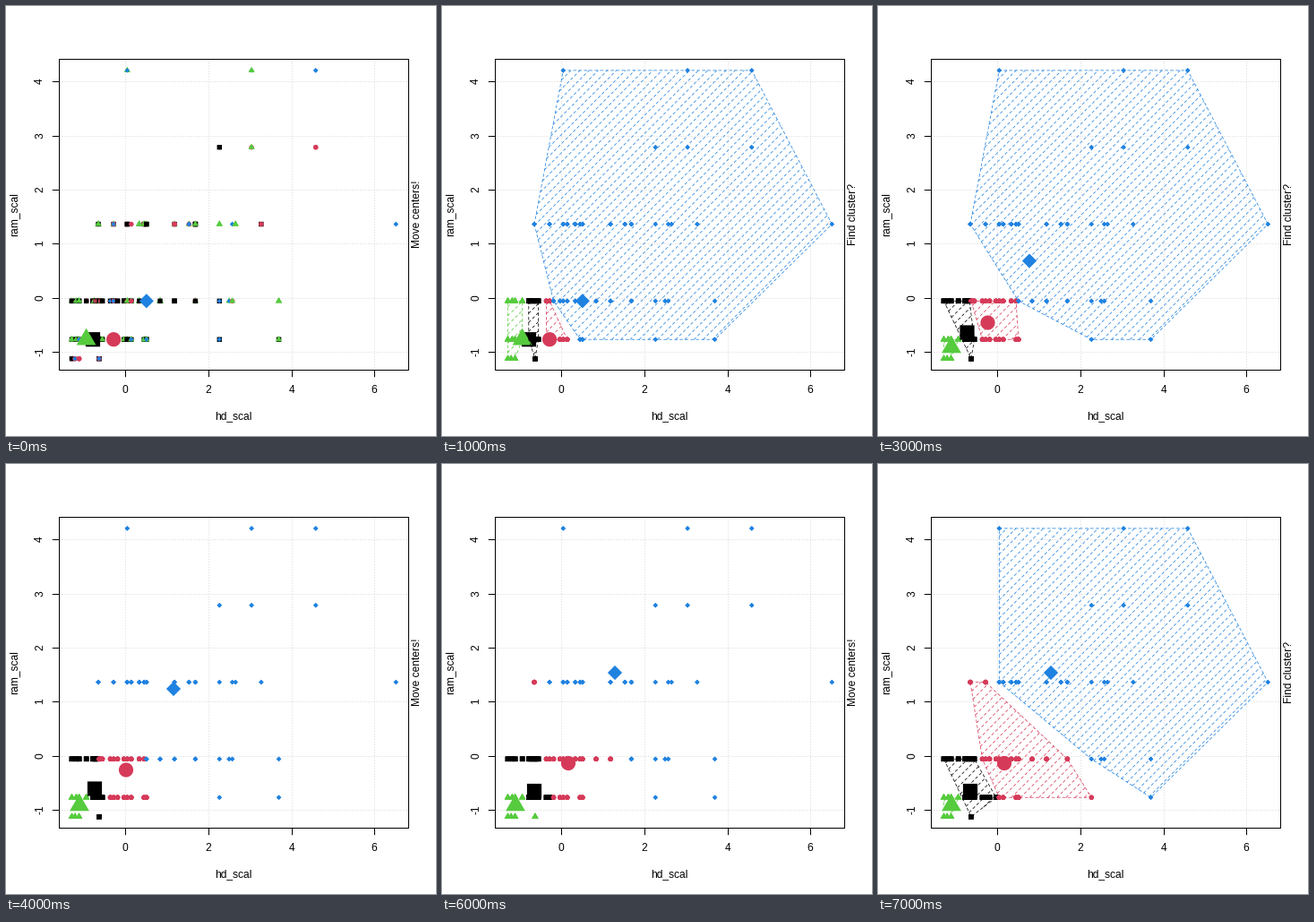
Write a matplotlib script that moves like this. It is 480 px wide and 480 px high and loops after 8 s.

```python
import numpy as np
import matplotlib.pyplot as plt
from matplotlib.animation import FuncAnimation
from matplotlib.collections import LineCollection, PolyCollection

plt.rcParams["font.family"] = "Liberation Sans"
SIZE = 480
COLORS = ["#000000", "#D63A59", "#56CB3E", "#1F82E0"]

# Plot box, and the pixel position and length of the scaled axes
LEFT, RIGHT, TOP, BOTTOM = 59.5, 449.5, 59.5, 406.5
MID_X, MID_Y = (LEFT + RIGHT) / 2, (TOP + BOTTOM) / 2
X0, Y0 = 133.8, 326.3
XU, YU = 46.3, 60.4
HATCH = 7.2 * np.sqrt(2)

# Common disk sizes, combined for each memory size
TINY = [80, 107, 125, 170]
SMALL = [*range(210, 271, 10), 320, 340, 365]
MEDIUM = [405, 425, 450]
LARGE = [530, 545]
DISKS = {
    32: [425, 1200, 1600],
    24: [1000, 1200, 1600],
    16: [245, 340, *MEDIUM[1:], 500, *LARGE, 720, 810, 850,
         1000, 1080, 1100, 1260, 2100],
    8: [*TINY, *SMALL, *MEDIUM, 500, *LARGE, 630, 720, 850,
        1000, 1060, 1080, 1370],
    4: [*TINY, *SMALL, *MEDIUM, *LARGE, 1000, 1370],
    2: [80, 100, 125, 250],
}

# Pixel centers of the black, red, green and blue group at each step
CENTERS = np.array([
    [(97, 372.2), (120.1, 372.2), (89.6, 372.2), (156.8, 329.3)],
    [(99.5, 364.5), (122.5, 353.5), (82, 381), (169, 284.5)],
    [(99, 362.5), (134, 341.5), (82, 381), (187, 251)],
    [(103, 365), (141, 334), (82, 381), (193, 233)],
])


def load_points():
    """Machines in pixels; common configurations occur several times."""
    points = []
    for ram, disks in DISKS.items():
        for disk in disks:
            x = 73.51 + (disk - 80) * 0.1791
            y = 393.69 - (ram - 2) * 10.726
            points += [(x, y)] * (2 if ram > 16 or disk >= 1000 else 5)
    return np.array(points)


POINTS = load_points()
START = np.random.default_rng(4).integers(0, 4, len(POINTS))


def nearest(centers):
    gap = (POINTS[:, None] - centers[None]) / (XU, YU)
    return (gap ** 2).sum(axis=2).argmin(axis=1)


def ring(n, turn):
    a = turn + np.arange(n) * 2 * np.pi / n
    return np.column_stack([np.cos(a), np.sin(a)])


# Square, circle, triangle and diamond
SHAPES = [ring(4, np.pi / 4) * np.sqrt(2), ring(32, 0),
          ring(3, -np.pi / 2) * 1.555, ring(4, 0)]


def hull(points):
    """Convex hull by monotone chain."""
    pts = sorted({(float(x), float(y)) for x, y in points})

    def chain(seq):
        out = []
        for x, y in seq:
            while len(out) > 1:
                (px, py), (qx, qy) = out[-2:]
                if (qx - px) * (y - py) > (qy - py) * (x - px):
                    break
                out.pop()
            out.append((x, y))
        return out[:-1]

    return np.array(chain(pts) + chain(pts[::-1]))


def hatch(poly):
    """Rising 45 degree lines clipped to a convex polygon."""
    level = (poly - (X0, Y0)).sum(axis=1)
    after, level2 = np.roll(poly, -1, axis=0), np.roll(level, -1)
    lines = []
    first = int(np.ceil(level.min() / HATCH))
    last = int(np.floor(level.max() / HATCH))
    for c in np.arange(first, last + 1) * HATCH:
        hits = []
        for p, q, a, b in zip(poly, after, level, level2):
            if (a < c) != (b < c):
                hits.append(tuple(p + (q - p) * (c - a) / (b - a)))
        if len(hits) == 2:
            lines.append(sorted(hits))
    return lines


fig = plt.figure(figsize=(SIZE / 72, SIZE / 72), dpi=72, facecolor="white")
ax = fig.add_axes([0, 0, 1, 1])
ax.set_xlim(0, SIZE)
ax.set_ylim(SIZE, 0)
ax.axis("off")


def write(x, y, text, turn=0):
    return ax.text(x, y, text, fontsize=12, rotation=turn, ha="center",
                   va="baseline", rotation_mode="anchor")


def line(xs, ys, **style):
    ax.plot(xs, ys, snap=False, **{"color": "black", "lw": 1, **style})


def draw_axes():
    dots = dict(color="lightgray", lw=0.75, ls=(0, (1, 3)),
                dash_capstyle="round", zorder=1)
    for v in range(0, 7, 2):
        x = np.floor(X0 + v * XU) + 0.5
        line([x, x], [BOTTOM, TOP], **dots)
        line([x, x], [BOTTOM, BOTTOM + 7.2])
        write(x - 0.5, 432.5, str(v))
    for v in range(-1, 5):
        y = np.floor(Y0 - v * YU) + 0.5
        line([LEFT, RIGHT], [y, y], **dots)
        line([LEFT, LEFT - 7.2], [y, y])
        write(41, y - 0.8, str(v), 90)
    line([LEFT, RIGHT, RIGHT, LEFT, LEFT], [TOP, TOP, BOTTOM, BOTTOM, TOP],
         solid_joinstyle="miter")
    write(MID_X - 0.6, 461.3, "hd_scal")
    write(12, MID_Y - 0.8, "ram_scal", 90)


draw_axes()
hint = write(462, MID_Y - 0.8, "", 90)
marks = PolyCollection([], linewidths=0, zorder=3, snap=False)
hulls = LineCollection([], linewidths=0.75, linestyles=[(0, (4, 4))],
                       capstyle="round", zorder=4, snap=False)
ax.add_collection(marks, autolim=False)
ax.add_collection(hulls, autolim=False)


def update(i):
    step, finding = divmod(i, 2)
    if i == 0:
        groups = START
    else:
        groups = nearest(CENTERS[step if finding else step - 1])

    verts = [p + 2.7 * SHAPES[k] for p, k in zip(POINTS, groups)]
    verts += [c + 8.1 * s for c, s in zip(CENTERS[step], SHAPES)]
    marks.set_verts(verts)
    marks.set_facecolor([COLORS[k] for k in groups] + COLORS)

    lines, inks = [], []
    if finding:
        for k, color in enumerate(COLORS):
            poly = hull(POINTS[groups == k])
            parts = hatch(poly) + [np.vstack([poly, poly[:1]])]
            lines += parts
            inks += [color] * len(parts)
    hulls.set_segments(lines)
    hulls.set_color(inks)
    hint.set_text("Find cluster?" if finding else "Move centers!")
    return marks, hulls, hint


anim = FuncAnimation(fig, update, frames=8, interval=1000, repeat=True,
                     repeat_delay=0, blit=False)
plt.show()
```
